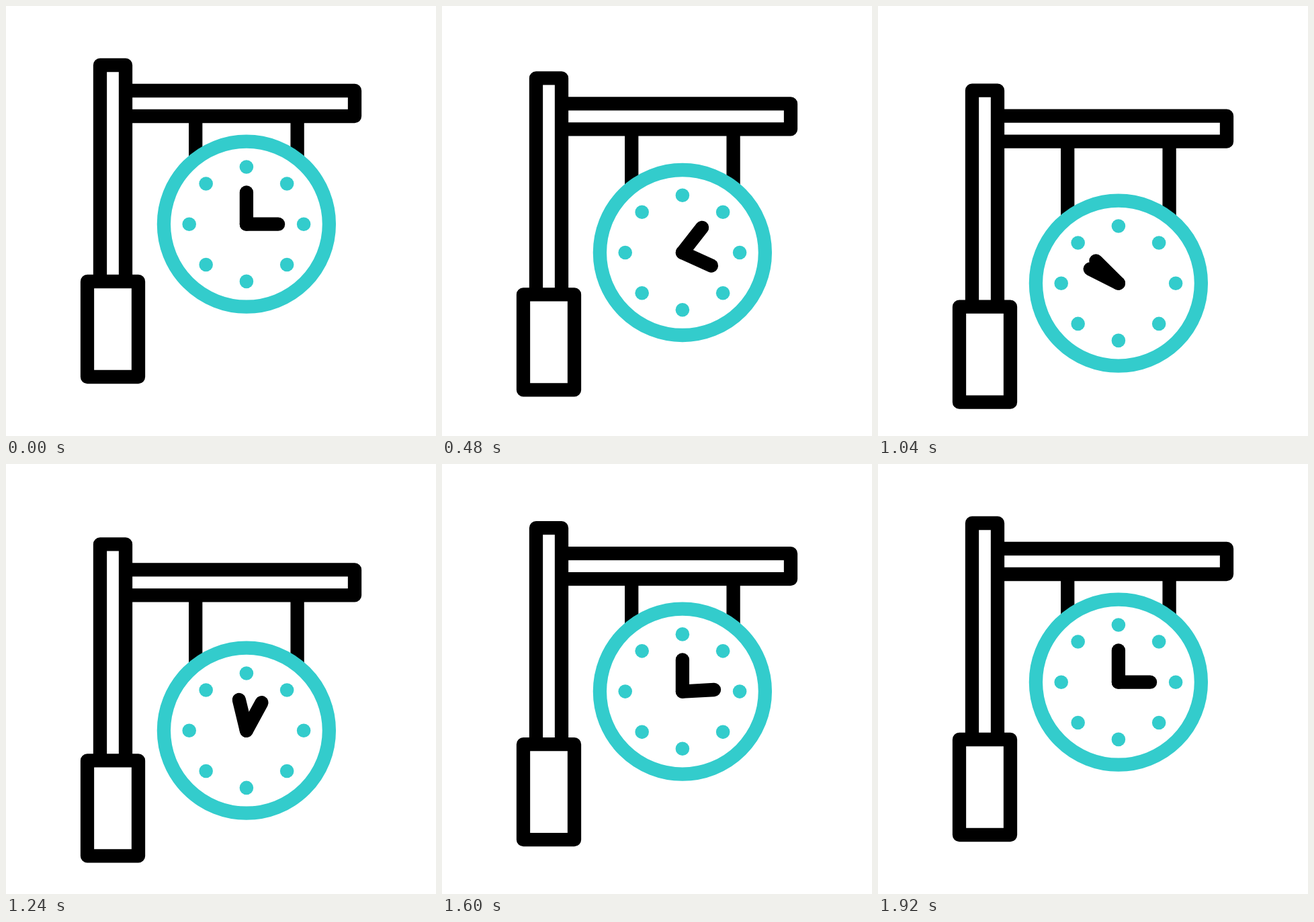
Write an HTML page that moves like this. It is 640x640 px and loops after 2040 ms.

```html
<!DOCTYPE html>
<html lang="en">
<head>
<meta charset="utf-8">
<title>Street clock</title>
<style>
  html, body { margin: 0; width: 100%; height: 100%; overflow: hidden; background: #fff; }
  svg { display: block; width: 100%; height: 100%; }
</style>
</head>
<body>
<svg viewBox="0 0 640 640" fill="none" stroke="#000" stroke-width="20.3" stroke-linejoin="round">
  <path id="ropes"/>
  <g id="post">
    <path d="M140 410V88H178V410M178 126H519V164H178M121 410H197V552H121Z"/>
  </g>
  <g id="clock">
    <circle r="123" stroke="#3cc"/>
    <g id="dots" fill="#3cc" stroke="none"></g>
    <g stroke-linecap="round">
      <path id="minute" d="M0 0V-47.2"/>
      <path id="hour" d="M0 0H47.2"/>
    </g>
  </g>
</svg>
<script>
const LOOP = 2040, STEP = 40;
const $ = id => document.getElementById(id);

for (let i = 0; i < 8; i++) {
  const dot = document.createElementNS('http://www.w3.org/2000/svg', 'circle');
  dot.setAttribute('cx', 85.2 * Math.cos(i * Math.PI / 4));
  dot.setAttribute('cy', 85.2 * Math.sin(i * Math.PI / 4));
  dot.setAttribute('r', 10.3);
  $('dots').append(dot);
}

// Progress from 0 to 1 between two times, eased by cubic-bezier(.5, 0, .5, 1).
function ease(t, from, to) {
  const x = Math.min(1, Math.max(0, (t - from) / (to - from)));
  let lo = 0, hi = 1;
  for (let i = 0; i < 24; i++) {
    const u = (lo + hi) / 2;
    if (1.5 * u * (1 - u) + u ** 3 < x) lo = u; else hi = u;
  }
  return lo * lo * (3 - 2 * lo);
}

const move = (id, value) => $(id).setAttribute('transform', value);

function draw(t) {
  const drop = 38.4 * (ease(t, 50, 905) - ease(t, 924, 1920));
  const sag = 90 * (ease(t, 80, 905) - ease(t, 922, 1884));
  const cy = 324.7 + sag, top = 164 + drop;
  move('post', `translate(0 ${drop})`);
  move('clock', `translate(357.9 ${cy})`);
  move('minute', `rotate(${360 * ease(t, 160, 1440)})`);
  move('hour', `rotate(${360 * ease(t, 160, 1722)})`);
  $('ropes').setAttribute('d', [282.2, 433.6].map(x => `M${x} ${top}V${cy - 97}`).join(''));
}

const start = performance.now();
function tick() {
  const t = (performance.now() - start) % LOOP;
  draw(Math.floor(t / STEP) * STEP);
  requestAnimationFrame(tick);
}
tick();
</script>
</body>
</html>
```
